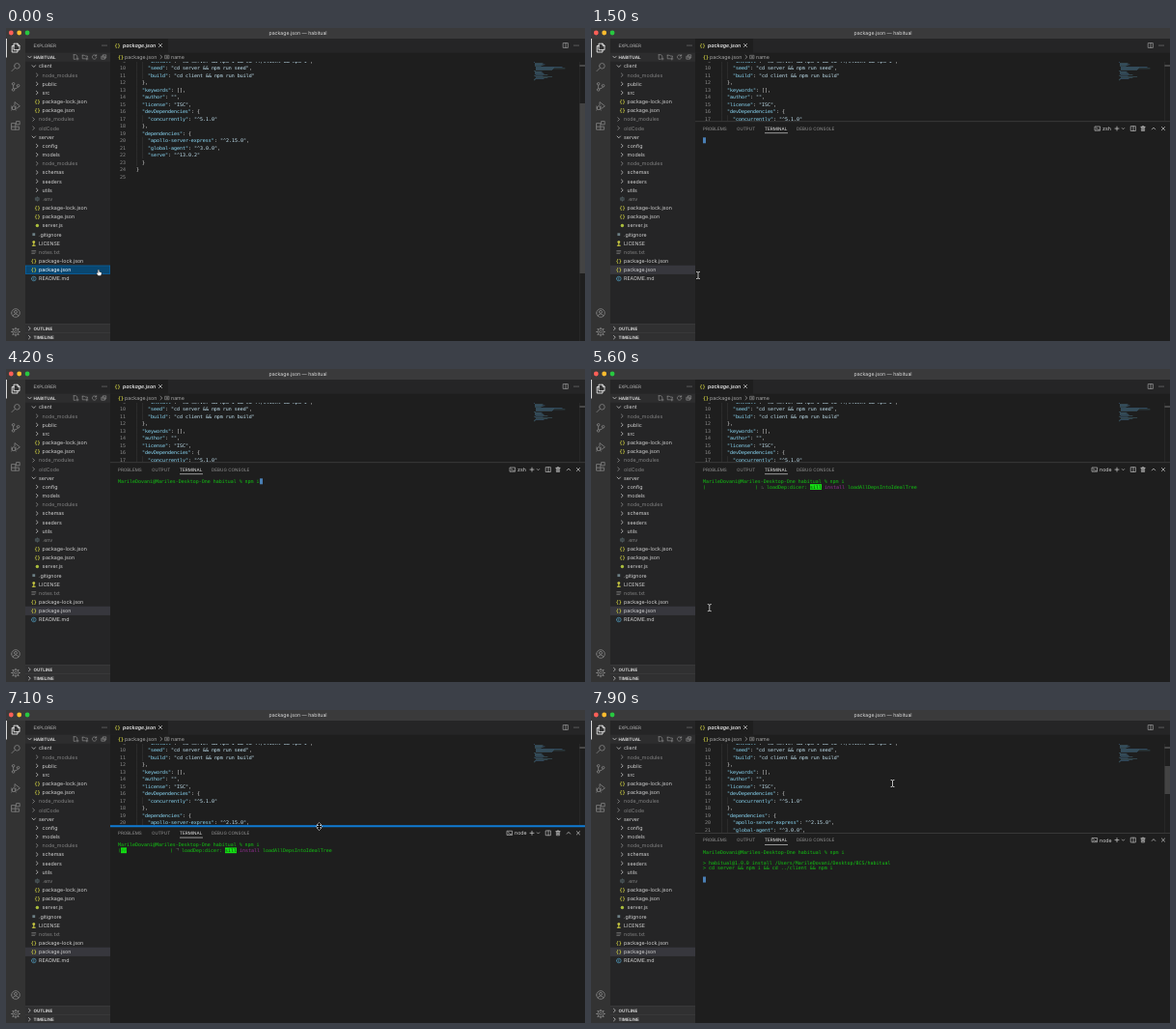
An HTML page with a canvas that plays this animation: 600x324 px, repeating every 8 s.

```html
<!DOCTYPE html>
<html lang="en">
<head>
<meta charset="utf-8">
<title>Editor session</title>
<style>
html, body { margin: 0; width: 100%; height: 100%; overflow: hidden; background: #1e1e1e; }
canvas { display: block; width: 600px; height: 324px; }
</style>
</head>
<body>
<canvas id="stage"></canvas>
<script>
const W = 600, H = 324, LOOP = 8000, STEP = 100;
const UI = 'Inter, "Open Sans", sans-serif';
const MONO = '"DejaVu Sans Mono", "Liberation Mono", monospace';
const SYM = '"DejaVu Sans", sans-serif';
const FG = '#d2d2d2', DIM = '#828282', GREEN = '#12c412', YELLOW = '#cbcb41';
const KEY = '#8fe0ff', STR = '#c6e6f4';
const ROW = 9.167, LINE = 7.5, TERM_LINE = 5.75, CH = 3;

const canvas = document.getElementById('stage');
const dpr = window.devicePixelRatio || 1;
canvas.width = W * dpr;
canvas.height = H * dpr;
const c = canvas.getContext('2d');
c.scale(dpr, dpr);

// drawing helpers
function rect(x, y, w, h, color) {
  c.fillStyle = color;
  c.fillRect(x, y, w, h);
}
function text(s, x, y, color, size = 5.3, o = {}) {
  c.font = `${o.style || ''} ${o.weight || 400} ${size}px ${o.font || UI}`;
  c.textAlign = o.align || 'left';
  c.textBaseline = 'alphabetic';
  c.textRendering = 'geometricPrecision';
  c.fillStyle = color;
  c.fillText(s, x, y + size * 0.36);
}
function mono(s, x, y, color) {
  text(s, x, y, color, 4.98, { font: MONO });
}
function stroke(path, x, y, color, width = 0.7, scale = 1) {
  c.save();
  c.translate(x, y);
  c.scale(scale, scale);
  c.strokeStyle = color;
  c.lineWidth = width / scale;
  c.lineJoin = c.lineCap = 'round';
  c.stroke(new Path2D(path));
  c.restore();
}
function dot(x, y, r, color) {
  c.fillStyle = color;
  c.beginPath();
  c.arc(x, y, r, 0, Math.PI * 2);
  c.fill();
}
function clipped(x, y, w, h, draw) {
  c.save();
  c.beginPath();
  c.rect(x, y, w, h);
  c.clip();
  draw();
  c.restore();
}
function ease(t, a, b) {
  const k = Math.min(1, Math.max(0, (t - a) / (b - a)));
  return k * k * (3 - 2 * k);
}
const mix = (a, b, k) => a + (b - a) * k;

const ICON = {
  right: 'M-1 -1.7L.8 0L-1 1.7',
  down: 'M-1.7 -.8L0 1L1.7 -.8',
  up: 'M-1.7 .8L0 -1L1.7 .8',
  close: 'M-1.6 -1.6L1.6 1.6M1.6 -1.6L-1.6 1.6',
  plus: 'M-2 0H2M0 -2V2',
  split: 'M-2.4 -2.4H2.4V2.4H-2.4ZM0 -2.4V2.4',
  trash: 'M-2.2 -1.7H2.2M-.7 -1.7V-2.5H.7V-1.7M-1.6 -1.7V2.4H1.6V-1.7M-.5 -.6V1.4M.5 -.6V1.4',
  shell: 'M-2.6 -2.1H2.6V2.1H-2.6ZM-1.5 -.9L-.5 0L-1.5 .9M.2 1H1.5',
  newFile: 'M-1.8 -2.3H.6L1.8 -1V.2M-1.8 -2.3V2.3H0M2 .8V3M.9 1.9H3.1',
  newFolder: 'M-2.6 -1.8H-.6L.2 -1H2.6V.2M-2.6 -1.8V1.8H.2M2 .8V3M.9 1.9H3.1',
  refresh: 'M1.9 -1.2A2.2 2.2 0 1 0 2.2 .5M2.1 -2.4V-1H.7',
  collapse: 'M-2.2 -.8H1V2.2H-2.2ZM-1 -.8V-2.2H2.3V1H1M-1.4 .7H.2',
  files: 'M-1.6 -4.3H2L4 -2.2V2.2H-1.6ZM-1.6 -2H-3.8V4.5H2V2.2M2 -4.3V-2.2H4',
  search: 'M-4 4L-.9 .9M-1.4 -1.3A2.8 2.8 0 1 0 4.2 -1.3A2.8 2.8 0 1 0 -1.4 -1.3',
  branch: 'M-2.4 -1.5V1.8M-3.7 -2.9A1.3 1.3 0 1 0 -1.1 -2.9A1.3 1.3 0 1 0 -3.7 -2.9M-3.7 3.2A1.3 1.3 0 1 0 -1.1 3.2A1.3 1.3 0 1 0 -3.7 3.2M1.3 -1A1.3 1.3 0 1 0 3.9 -1A1.3 1.3 0 1 0 1.3 -1M2.6 .3Q2.2 1.8 -1.4 2.4',
  debug: 'M-1 -1V-4.2L4.4 0L1 2.5M-3.7 1.9A1.7 2 0 1 0 -.3 1.9A1.7 2 0 1 0 -3.7 1.9M-4.5 .3L-3.5 1M-4.6 2.2H-3.7M-4.4 4.2L-3.4 3.4M.5 .3L-.5 1M.6 2.2H-.3M.4 4.2L-.6 3.4',
  blocks: 'M-4 -2.3H-.2V1.3H3.6V4.3H-4ZM-4 1.3H-.2V4.3M1 -4.3H4.2V-1H1Z',
  user: 'M-4.3 0A4.3 4.3 0 1 0 4.3 0A4.3 4.3 0 1 0 -4.3 0M-1.5 -1.1A1.5 1.5 0 1 0 1.5 -1.1A1.5 1.5 0 1 0 -1.5 -1.1M-2.8 3.2Q-2.4 .9 0 .9Q2.4 .9 2.8 3.2',
  hub: 'M-1.4 0A1.4 1.4 0 1 0 1.4 0A1.4 1.4 0 1 0 -1.4 0M-3.2 0A3.2 3.2 0 1 0 3.2 0A3.2 3.2 0 1 0 -3.2 0'
};

function gear(x, y, scale, color) {
  stroke(ICON.hub, x, y, color, 0.7 * scale, scale);
  for (let i = 0; i < 8; i++) {
    const a = i * Math.PI / 4;
    const px = Math.cos(a) * scale, py = Math.sin(a) * scale;
    stroke(`M${px * 3.4} ${py * 3.4}L${px * 4.3} ${py * 4.3}`, x, y, color, 1.1 * scale);
  }
}
function ellipsis(x, y) {
  for (let i = -1; i < 2; i++) dot(x + i * 2, y, 0.5, '#b0b0b0');
}
function braces(x, y, color = YELLOW) {
  text('{}', x, y, color, 5, { font: MONO, weight: 700, align: 'center' });
}

// name, kind (open/closed folder or file icon), depth, muted
const TREE = [
  ['client', 'open', 0], ['node_modules', 'closed', 1, 1], ['public', 'closed', 1], ['src', 'closed', 1],
  ['package-lock.json', 'json', 1], ['package.json', 'json', 1],
  ['node_modules', 'closed', 0, 1], ['oldCode', 'closed', 0, 1],
  ['server', 'open', 0], ['config', 'closed', 1], ['models', 'closed', 1], ['node_modules', 'closed', 1, 1],
  ['schemas', 'closed', 1], ['seeders', 'closed', 1], ['utils', 'closed', 1], ['.env', 'gear', 1, 1],
  ['package-lock.json', 'json', 1], ['package.json', 'json', 1], ['server.js', 'dot', 1],
  ['.gitignore', 'square', 0], ['LICENSE', 'key', 0], ['notes.txt', 'lines', 0, 1],
  ['package-lock.json', 'json', 0], ['package.json', 'json', 0], ['README.md', 'info', 0]
];
const SELECTED = 23;

function fileIcon(kind, x, y) {
  if (kind === 'json') braces(x, y);
  if (kind === 'gear') gear(x, y, 0.5, '#6d8086');
  if (kind === 'dot') dot(x, y, 1.7, '#a9bd3c');
  if (kind === 'square') rect(x - 1.4, y - 1.4, 2.8, 2.8, '#6d8086');
  if (kind === 'lines') stroke('M-2 -1.5H2M-2 0H2M-2 1.5H1', x, y, '#777');
  if (kind === 'key') {
    dot(x, y - 1.3, 1.4, YELLOW);
    stroke('M0 0V2.6M-1.5 2.4H1.5', x, y, YELLOW, 1);
  }
  if (kind === 'info') {
    stroke('M-2.3 0A2.3 2.3 0 1 0 2.3 0A2.3 2.3 0 1 0 -2.3 0M0 -.2V1.2M0 -1.2V-1.1', x, y, '#519aba');
  }
}

function drawFrame() {
  rect(0, 0, W, H, '#1e1e1e');
  rect(0, 0, W, 11, '#3a3a3b');
  ['#ff5f57', '#febc2e', '#28c840'].forEach((col, i) => dot(5.3 + i * 8.4, 5, 2.4, col));
  text('package.json — habitual', 302.5, 5, '#dadada', 5.2, { align: 'center' });
  rect(0, 11, 20, H - 11, '#333333');
  rect(0, 11, 0.8, 19.5, '#ffffff');
  ['files', 'search', 'branch', 'debug', 'blocks'].forEach((name, i) =>
    stroke(ICON[name], 10, 20.5 + i * 20.1, i ? '#858585' : '#ffffff', 0.8));
  stroke(ICON.user, 10, 295, '#858585', 0.8);
  gear(10, 314.5, 1, '#858585');
}

function drawSidebar(focused) {
  rect(20, 11, 88, H - 11, '#252526');
  text('EXPLORER', 28.5, 18, '#bbbbbb', 4.58);
  ellipsis(102, 18);
  rect(20, 25.6, 88, ROW, '#2d2d2e');
  stroke(ICON.down, 24.5, 30, FG);
  text('HABITUAL', 28.5, 30, FG, 4.5, { weight: 700 });
  ['newFile', 'newFolder', 'refresh', 'collapse'].forEach((name, i) =>
    stroke(ICON[name], 72 + i * 9.8, 30, '#a8a8a8', 0.5));

  const top = 39.5 + SELECTED * ROW - ROW / 2;
  rect(20, top, 88, ROW, focused ? '#094771' : '#37373d');
  if (focused) {
    c.strokeStyle = '#0a6fb5';
    c.lineWidth = 0.5;
    c.strokeRect(20.25, top + 0.25, 87.5, ROW - 0.5);
  }
  TREE.forEach(([name, kind, depth, muted], i) => {
    const y = 39.5 + i * ROW, x = 28.8 + depth * 3.6;
    const color = muted ? DIM : i === SELECTED && focused ? '#ffffff' : FG;
    if (kind === 'open') stroke(ICON.down, x, y, FG);
    else if (kind === 'closed') stroke(ICON.right, x, y, muted ? '#999' : FG);
    else fileIcon(kind, x, y);
    text(name, 34 + depth * 3.6, y, color);
  });
  ['OUTLINE', 'TIMELINE'].forEach((name, i) => {
    const y = 311 + i * 9.2;
    rect(20, y - 4.8, 88, 9.2, '#303031');
    rect(20, y - 4.8, 88, 0.5, '#434344');
    stroke(ICON.right, 24.5, y, FG);
    text(name, 28.5, y, FG, 4.5, { weight: 700 });
  });
}

const CODE = [
  '    "install": "cd server && npm i && cd ../client && npm i",',
  '    "seed": "cd server && npm run seed",',
  '    "build": "cd client && npm run build"',
  '  },', '  "keywords": [],', '  "author": "",', '  "license": "ISC",',
  '  "devDependencies": {', '    "concurrently": "^5.1.0"', '  },',
  '  "dependencies": {', '    "apollo-server-express": "^2.15.0",',
  '    "global-agent": "^3.0.0",', '    "serve": "^13.0.2"', '  }', '}', ''
];

// slider: [top, height] of the visible scroll thumb, or null
function drawEditor(bottom, slider) {
  rect(108, 11, W - 108, 14.6, '#252526');
  rect(108, 11, 60, 14.6, '#1e1e1e');
  braces(115.5, 17.8);
  text('package.json', 121, 17.8, '#ffffff', 5.3, { style: 'italic', weight: 500 });
  stroke(ICON.close, 160, 18, FG);
  stroke(ICON.split, 580, 18, '#b0b0b0', 0.6);
  ellipsis(591, 18);
  braces(119, 30);
  text('package.json', 123, 30, '#a6a6a6');
  stroke(ICON.right, 161, 30, '#a6a6a6');
  stroke('M-2 -1.7H2V1.7H-2ZM-.8 -.4H.8M-.8 .6H.8', 167, 30, '#a6a6a6', 0.5);
  text('name', 171, 30, '#a6a6a6');

  clipped(108, 35, W - 108, bottom - 35, () => {
    CODE.forEach((line, i) => {
      const y = 34 + i * LINE;
      for (let col = 0; col < line.search(/\S/); col += 2) {
        rect(135 + col * CH, y - LINE / 2, 0.4, LINE, '#404040');
      }
      text(String(i + 9), 124, y, '#8c8c8c', 4.98, { font: MONO, align: 'right' });
      for (const m of line.matchAll(/"[^"]*"|[^\s"]+/g)) {
        const quoted = m[0][0] === '"';
        const isKey = quoted && line[m.index + m[0].length] === ':';
        mono(m[0], 135 + m.index * CH, y, isKey ? KEY : quoted ? STR : '#e0e0e0');
      }
    });
    drawMinimap();
    rect(594, 35, 0.5, bottom - 35, '#303030');
    if (slider) rect(594.5, slider[0], 5.5, slider[1], '#434343');
    rect(594.5, 38.6, 5.5, 0.8, '#8a8a8a');
  });
}

function drawMinimap() {
  const widths = [1, 9, 8, 11, 9, 7, 29, 20, 32, 19, 18, 2, 8, 7, 9, 10, 13, 2, 9, 18, 13, 10, 2, 1];
  widths.forEach((w, i) => {
    const inset = w < 3 ? 0 : w > 12 ? 2 : 1;
    rect(547 + inset, 35.3 + i * 0.8, w * 0.95, 0.45, i % 3 ? '#48717f' : '#4779a3');
  });
}

const USER = 'MarileDovani';
const PROMPT = USER + '@Mariles-Desktop-One habitual % ';
const KEYS_AT = [2600, 3000, 3200, 3500, 3900];
const ENTER = 5200, INSTALL = 7600;

function termCursor(x, y) {
  rect(x, y - 3, CH, 6, '#4a7fb5');
}
function progress(t, y) {
  const post = t >= 7200;
  const filled = post ? 8 : t >= 6000 ? 2 : 0;
  const at = col => 116 + col * CH;
  const label = post ? 'postinstall:' : 'loadDep:dicer:';
  mono('(', at(0), y, GREEN);
  if (filled) {
    rect(at(1), y - 2.9, filled * CH, 5.8, '#14e314');
    mono('#'.repeat(filled), at(1), y, '#0fae0f');
  }
  mono(')', at(18), y, GREEN);
  mono('⠋⠙⠹⠸⠼⠴⠦⠧⠇⠏'[(t / STEP) % 10], at(20), y, '#7a7a7a');
  mono(label, at(22), y, GREEN);
  const sill = 23 + label.length;
  rect(at(sill), y - 2.9, 4 * CH, 5.8, '#14e314');
  mono('sill', at(sill), y, '#10330f');
  mono('install', at(sill + 5), y, '#9a2f9a');
  mono(post ? 'executeActions' : 'loadAllDepsIntoIdealTree', at(sill + 13), y, GREEN);
}

function drawTerminal(t, top) {
  const y0 = top + 19.8;
  if (t < 1700) return termCursor(116, y0);
  if (t >= 7200 && t < INSTALL) return progress(t, top + 14.2);
  const typed = 'npm i'.slice(0, KEYS_AT.filter(k => t >= k).length);
  const row = n => y0 + n * TERM_LINE;
  mono(PROMPT + typed, 116, y0, GREEN);
  if (t < ENTER) termCursor(116 + (PROMPT + typed).length * CH, y0);
  else if (t < INSTALL) progress(t, row(1));
  else {
    mono(`> habitual@1.0.0 install /Users/${USER}/Desktop/BCS/habitual`, 116, row(2) - 0.5, GREEN);
    mono('> cd server && npm i && cd ../client && npm i', 116, row(3) - 0.5, GREEN);
    termCursor(116, row(5));
  }
}

function drawPanel(t, top, sash) {
  rect(108, top, W - 108, H - top, '#1e1e1e');
  rect(108, top, W - 108, 0.6, '#4a4a4a');
  const y = top + 7.6;
  const tabs = [['PROBLEMS', 116], ['OUTPUT', 151], ['TERMINAL', 180], ['DEBUG CONSOLE', 213]];
  tabs.forEach(([name, x], i) => text(name, x, y, i === 2 ? '#e7e7e7' : '#969696', 4.58));
  rect(180, y + 4.4, 24, 0.6, '#e7e7e7');
  const node = t >= ENTER;
  stroke(ICON.shell, node ? 522 : 525, y, FG, 0.6);
  text(node ? 'node' : 'zsh', node ? 527 : 530, y, FG);
  stroke(ICON.plus, 545, y, FG);
  stroke(ICON.down, 551.5, y, FG, 0.6, 0.7);
  stroke(ICON.split, 562, y, FG, 0.6);
  stroke(ICON.trash, 572, y, FG, 0.6);
  stroke(ICON.up, 583, y, FG);
  stroke(ICON.close, 593, y, FG);
  clipped(108, top + 13.2, W - 108, H, () => drawTerminal(t, top));
  if (sash) rect(108, top - 0.5, W - 108, 2, '#0e7ad3');
}

// label, centre y, shortcut
const MENU = [
  ['Open to the Side', 230, '^⏎'], ['Open With...', 239.2], ['Reveal in Folder', 248.3, '⌥⌘R'],
  ['Open in Integrated Terminal', 257.5], ['Select for Compare', 271.2], ['Open Timeline', 285],
  ['Cut', 298.7, '⌘X'], ['Copy', 308, '⌘C'], ['Copy Path', 321.8, '⌥⌘C']
];

function drawMenu(mouseY) {
  c.beginPath();
  c.roundRect(95, 223, 114, 120, 3);
  c.fillStyle = '#29292b';
  c.fill();
  c.strokeStyle = '#505052';
  c.lineWidth = 0.5;
  c.stroke();
  [264.3, 278.1, 291.9, 315].forEach(y => rect(100, y, 104, 0.5, '#4a4a4c'));
  MENU.forEach(([label, y, keys]) => {
    const hot = Math.abs(mouseY - y) < 4.6;
    if (hot) {
      c.beginPath();
      c.roundRect(97, y - 4.5, 110, 9, 1.5);
      c.fillStyle = '#2c9a1c';
      c.fill();
    }
    text(label, 100.5, y, hot ? '#ffffff' : '#e4e4e4', 5.4);
    if (keys) {
      [...keys].reverse().forEach((k, i) =>
        text(k, 200.5 - i * 6, y, '#747476', 5, { font: SYM, align: 'center' }));
    }
  });
}

function outlined(path, x, y, fill, edge) {
  c.save();
  c.translate(x, y);
  const p = new Path2D(path);
  c.lineJoin = 'round';
  c.lineWidth = 0.9;
  c.strokeStyle = edge;
  c.stroke(p);
  c.fillStyle = fill;
  c.fill(p);
  c.restore();
}
function drawMouse(kind, x, y) {
  if (kind === 'arrow') outlined('M0 0V6.4L1.5 5L2.5 7.2L3.5 6.8L2.6 4.6H4.6Z', x, y, '#000', '#fff');
  if (kind === 'hand') outlined('M-.9 -2.6Q-.3 -3.2 .1 -2.4V-.6L2.1 0Q2.8 .4 2.5 1.6L1.9 3.2H-.8L-2.3 1Q-2.1 .2 -1.5 .6L-.9 1Z', x, y, '#fff', '#222');
  if (kind === 'beam') {
    const p = 'M-1.6 -3.6Q0 -3.6 0 -2.8Q0 -3.6 1.6 -3.6M0 -2.8V2.8M-1.6 3.6Q0 3.6 0 2.8Q0 3.6 1.6 3.6';
    stroke(p, x, y, '#111', 1.6);
    stroke(p, x, y, '#e8e8e8', 0.8);
  }
  if (kind === 'resize') outlined('M0 -4L2 -1.8H.6V-.6H2.6V.6H.6V1.8H2L0 4L-2 1.8H-.6V.6H-2.6V-.6H-.6V-1.8H-2Z', x, y, '#000', '#fff');
}

function mouseAt(t, top) {
  if (t < 300) return ['hand', 96.3, 253];
  if (t < 1100) {
    const k = ease(t, 300, 800);
    return ['arrow', mix(95, 111, k), mix(250, 258.5, k)];
  }
  if (t < 2500) return ['beam', 111, 256];
  if (t < 5500) return null;
  if (t < 6200) {
    const k = ease(t, 5500, 6200);
    return ['beam', mix(111, 324, k), mix(256, 96, k)];
  }
  if (t < 7500) return ['resize', 324.5, top + 0.8];
  const k = ease(t, 7400, 7800);
  return ['beam', mix(324, 312.5, k), mix(126, 76, k)];
}

function render(t) {
  const open = t >= 1200;
  const top = t >= 7500 ? 127 : mix(96.5, 125.5, ease(t, 6600, 7300));
  const mouse = mouseAt(t, top);
  const slider = !open ? [78, 176] : t >= 7500 ? [58, 29] : null;
  drawFrame();
  drawSidebar(!open);
  drawEditor(open ? top : H, slider);
  if (open) drawPanel(t, top, t >= 6200 && t < 7500);
  if (t >= 300 && t < 1100) drawMenu(t < 400 ? 0 : mouse[2]);
  if (mouse) drawMouse(...mouse);
}

function tick() {
  const t = performance.now() % LOOP;
  render(Math.floor(t / STEP) * STEP);
  requestAnimationFrame(tick);
}
tick();
</script>
</body>
</html>
```
